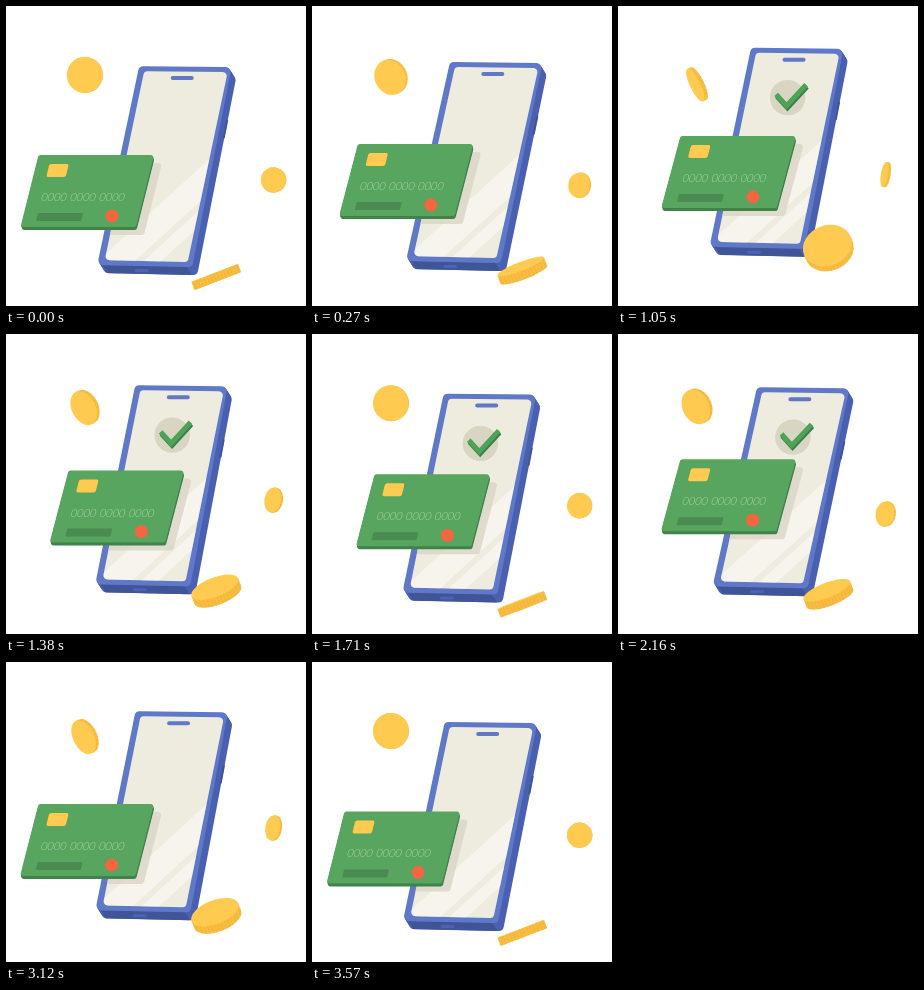
An HTML page with a canvas for the animation above (3.6 s loop, 300 by 300 pixels).

```html
<!DOCTYPE html>
<html lang="en">
<head>
<meta charset="utf-8">
<title>Card payment</title>
<style>
html, body { margin: 0; width: 100%; height: 100%; overflow: hidden; background: #fff; }
canvas { display: block; width: 300px; height: 300px; }
</style>
</head>
<body>
<canvas id="stage" width="300" height="300"></canvas>
<script>
const ctx = document.getElementById('stage').getContext('2d');
const LOOP = 3600;
const BOB = 1800;

const color = {
  frame: '#5f78c8', side: '#4a60b0', base: '#3f5597', port: '#4a63b5',
  screen: '#eeebdf', shade: '#dcd8c8', disc: '#d8d5c3',
  card: '#57a55f', cardEdge: '#3f8349', cardBar: '#498b51', digits: '#a9d3a5',
  coin: '#ffca50', coinEdge: '#f8bd40', ridge: '#dda02f', mark: '#f4663f',
  tick: '#4fa358', tickEdge: '#3a8044'
};

const clamp = u => Math.max(0, Math.min(1, u));
const span = (t, from, to) => clamp((t - from) / (to - from));
const inOut = u => (1 - Math.cos(Math.PI * u)) / 2;
const backOut = u => 1 + 2.7 * (u - 1) ** 3 + 1.7 * (u - 1) ** 2;
const backIn = u => 1 - backOut(1 - u);

// Smooth periodic curve through [time, value] keys.
function loopCurve(keys, t) {
  const n = keys.length;
  const at = i => {
    const k = keys[(i + n) % n];
    return [k[0] + Math.floor(i / n) * LOOP, k[1]];
  };
  let i = 0;
  while (at(i + 1)[0] <= t) i++;
  const [a, b, c, d] = [at(i - 1), at(i), at(i + 1), at(i + 2)];
  const h = c[0] - b[0], u = (t - b[0]) / h;
  const m0 = (c[1] - a[1]) / (c[0] - a[0]) * h;
  const m1 = (d[1] - b[1]) / (d[0] - b[0]) * h;
  return b[1] + u * m0 + u * u * (3 * (c[1] - b[1]) - 2 * m0 - m1)
    + u * u * u * (2 * (b[1] - c[1]) + m0 + m1);
}

const REST_Y = 149;
const cardHeight = [[0, REST_Y], [570, 125], [1050, 130], [1750, 140], [2520, 115], [3120, 142]];

function tracePoly(points, radius = 0) {
  const n = points.length;
  const [lx, ly] = points[n - 1];
  ctx.beginPath();
  ctx.moveTo((lx + points[0][0]) / 2, (ly + points[0][1]) / 2);
  points.forEach((p, i) => ctx.arcTo(...p, ...points[(i + 1) % n], radius));
  ctx.closePath();
}

function fillPoly(points, radius, fill) {
  tracePoly(points, radius);
  ctx.fillStyle = fill;
  ctx.fill();
}

function fillRound(x, y, w, h, r, fill) {
  ctx.beginPath();
  ctx.roundRect(x, y, w, h, r);
  ctx.fillStyle = fill;
  ctx.fill();
}

function fillEllipse(x, y, rx, ry, fill) {
  ctx.beginPath();
  ctx.ellipse(x, y, Math.max(0, rx), Math.max(0, ry), 0, 0, Math.PI * 2);
  ctx.fillStyle = fill;
  ctx.fill();
}

function strokeLine(points, width, stroke) {
  ctx.beginPath();
  points.forEach(p => ctx.lineTo(...p));
  ctx.lineWidth = width;
  ctx.strokeStyle = stroke;
  ctx.stroke();
}

function withState(draw) {
  ctx.save();
  draw();
  ctx.restore();
}

// The disc turns about its long axis; `open` is the visible share of its face.
function drawCoin(x, y, r, open, degrees, thickness) {
  const depth = thickness * Math.sqrt(1 - open * open);
  const back = depth / 2;
  withState(() => {
    ctx.translate(x, y);
    ctx.rotate(degrees * Math.PI / 180);
    fillEllipse(back, 0, r * open, r, color.coinEdge);
    ctx.fillRect(-back, -r, depth, 2 * r);
    ctx.globalAlpha = 0.35;
    for (let v = -r + 2; v < r && depth > 1; v += 3.5) {
      const rim = open * Math.sqrt(r * r - v * v) - back;
      strokeLine([[rim, v], [rim + depth, v]], 0.8, color.ridge);
    }
    ctx.globalAlpha = 1;
    fillEllipse(-back, 0, r * open, r, color.coin);
  });
}

function cardOutline(x, y, lean) {
  return [[x, y], [x + 115.5, y], [x + 115.5 - lean, y + 72], [x - lean, y + 72]];
}

function drawTick(progress) {
  if (progress <= 0) return;
  const start = [24.5, 46.5], bend = [35, 58], end = [54.5, 37];
  const mix = (a, b, u) => a.map((v, i) => v + (b[i] - v) * u);
  const path = [start, mix(start, bend, clamp(progress * 3))];
  if (progress > 1 / 3) path.push(mix(bend, end, (progress - 1 / 3) * 1.5));
  ctx.lineJoin = 'miter';
  strokeLine(path.map(([x, y]) => [x + 0.8, y + 2]), 5, color.tickEdge);
  strokeLine(path, 5, color.tick);
}

function drawPhone(t, c, s, card) {
  const x = 135 + 5.2 * s - 1.3 * c;
  const y = 50.3 + 9.8 * c;
  const lean = (0.4 * (c - 1) - 2.4 * s) / 205;
  const front = [[-0.5, 0], [92, 1], [52.5, 201], [-42.5, 199]];
  const screen = [[4.5, 5], [88, 6], [48, 196], [-35, 194]];
  const behind = (p, d) => [p[0] + d * 5 / 8, p[1] + d];

  withState(() => {
    ctx.transform(1, 0, lean, 1, x, y);
    for (let d = 8; d > 0; d--) {
      fillPoly(front.map(p => behind(p, d)), 5, color.side);
    }
    const [left, right] = [[-37, 199], [47, 201]];
    fillPoly([left, right, behind(right, 8), behind(left, 8)], 0, color.base);
    fillPoly(front, 5, color.frame);
    fillRound(-5, 203, 14, 3, 1.5, color.port);
    strokeLine([[87.5, 54], [84, 72]], 2, color.base);

    fillPoly(screen, 4, color.screen);
    tracePoly(screen, 4);
    ctx.clip();

    const glare = (top, width) => fillPoly([
      [74, top], [-40, top + 104], [-40, top + 104 + width], [74, top + width]
    ], 0, 'rgba(255,255,255,.42)');
    glare(89, 34);
    glare(131, 16);

    withState(() => {
      ctx.setTransform(1, 0, 0, 1, 0, 0);
      ctx.globalAlpha = 0.85;
      fillPoly(cardOutline(card.x + 8, card.y + 8, card.lean), 3, color.shade);
    });

    fillRound(31, 10, 23, 4, 2, color.frame);

    const grow = t < 1800
      ? (t > 480 ? backOut(span(t, 480, 800)) : 0)
      : 1 - backIn(span(t, 2400, 2700));
    if (grow > 0) fillEllipse(36, 49.8, 17.7 * grow, 17.7 * grow, color.disc);
    drawTick(inOut(span(t, 750, 1000)) - inOut(span(t, 2200, 2450)));
  });
}

function drawCard({ x, y, lean }) {
  const skew = lean / 75;
  for (let d = 3; d > 0; d--) {
    fillPoly(cardOutline(x + d * 0.2, y + d, lean), 2.5, color.cardEdge);
  }
  fillPoly(cardOutline(x, y, lean), 2.5, color.card);
  withState(() => {
    ctx.transform(1, 0, -skew, 1, x, y);
    fillRound(13, 9, 19.5, 13, 2, color.coin);
    fillRound(13.4, 58, 45, 8, 1, color.cardBar);
    ctx.font = '300 11px Lato, "Liberation Sans", sans-serif';
    ctx.fillStyle = color.digits;
    for (let group = 0; group < 3; group++) ctx.fillText('0000', 13 + 29 * group, 46);
  });
  fillEllipse(x + 88.2 - skew * 61, y + 61, 6.5, 6.5, color.mark);
}

function draw(t) {
  const phase = t / BOB * Math.PI * 2;
  const c = Math.cos(phase), s = Math.sin(phase);
  const open = 0.62 + 0.38 * c;
  const slide = inOut(span(t, 0, 580)) - inOut(span(t, 2160, 2790));
  const card = { x: 32.5 + 30 * slide, y: loopCurve(cardHeight, t) };
  card.lean = 18 + 0.07 * (REST_Y - card.y);

  ctx.fillStyle = '#fff';
  ctx.fillRect(0, 0, 300, 300);
  drawCoin(79, 74 - 5 * c, 18, open, -26, 4);
  drawCoin(267.7, 173 + 7 * s + c, 12.7, open, 9, 2.5);
  drawPhone(t, c, s, card);
  drawCard(card);
  drawCoin(210.3, 255.5 + 15.5 * c, 25, 0.43 * (1 - c), 69, 9);
}

let begin;
function tick(now) {
  begin ??= now;
  draw((now - begin) % LOOP);
  requestAnimationFrame(tick);
}
draw(0);
requestAnimationFrame(tick);
</script>
</body>
</html>
```
